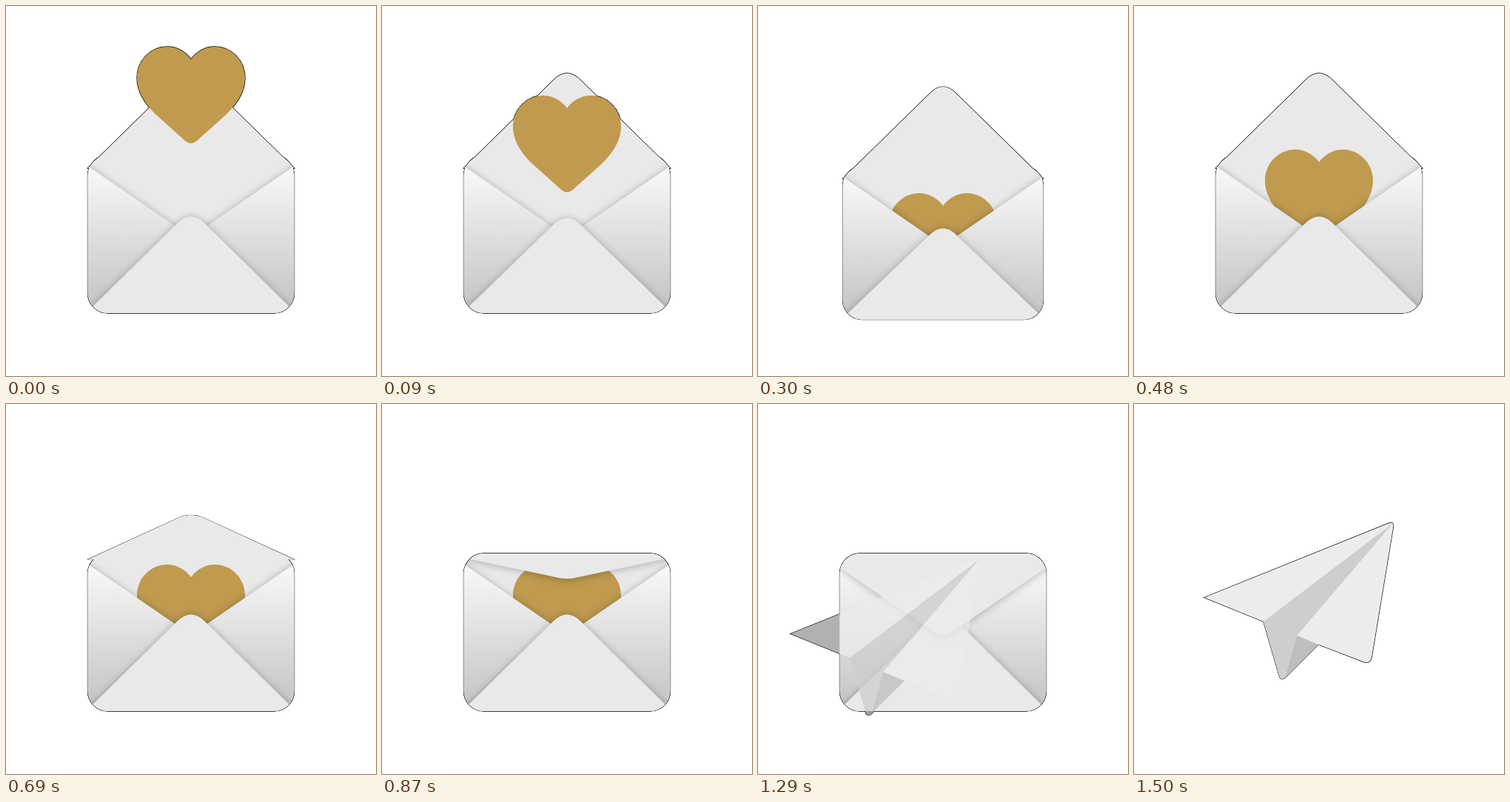
Recreate the animation shown at these times as an HTML page. Size 500 by 500 pixels, loop 1830 ms.

```html
<!DOCTYPE html>
<html lang="en">
<head>
<meta charset="utf-8">
<title>Envelope</title>
<style>
  html, body { margin: 0; width: 100%; height: 100%; overflow: hidden; background: #fff; }
  svg { display: block; width: 100%; height: 100%; }
  .edge { fill: #000; stroke: #000; stroke-width: 1.3; }
  .edge * { vector-effect: non-scaling-stroke; }
  .shade { filter: drop-shadow(0 0 5px rgba(0, 0, 0, .25)); }
  .flap-shade { filter: drop-shadow(0 3px 5px rgba(0, 0, 0, .2)); }
</style>
</head>
<body>
<svg viewBox="0 0 500 500">
  <defs>
    <linearGradient id="side" gradientUnits="userSpaceOnUse" x1="0" y1="216" x2="0" y2="412">
      <stop offset="0" stop-color="#f9f9f9"/>
      <stop offset="1" stop-color="#c3c3c3"/>
    </linearGradient>
    <rect id="body" x="110.5" y="202" width="279" height="213" rx="27"/>
    <path id="openFlap" d="M110.5 17L233-103Q250-119 267-103L389.5 17Z"/>
    <path id="heart" d="M0 17C-8 6-20 0-32 0C-55 0-73 19-73 42C-73 62-60 80-46 93L-7 128Q0 133 7 128L46 93C60 80 73 62 73 42C73 19 55 0 32 0C20 0 8 6 0 17Z"/>
    <path id="planeShape" d="M95 261.5L346 160.5Q351 160 350.5 165L321 343Q319 350 312 349L249 325L204 370Q200 373 197 370L175 294Z"/>
    <clipPath id="bodyClip"><use href="#body"/></clipPath>
  </defs>

  <g id="letterEdge" class="edge">
    <g class="letterPose">
      <use href="#body"/>
      <use class="openPose" href="#openFlap"/>
    </g>
    <use class="heartPose" href="#heart"/>
  </g>
  <use id="planeEdge" class="edge planePose" href="#planeShape"/>

  <g id="letter">
    <g class="letterPose" fill="#e9e9e9">
      <use href="#body"/>
      <use class="openPose" href="#openFlap"/>
    </g>
    <use class="heartPose" href="#heart" fill="#bf9a4f"/>
    <g class="letterPose">
      <g clip-path="url(#bodyClip)">
        <g class="shade" fill="url(#side)">
          <path d="M100 209L250 312L100 422Z"/>
          <path d="M400 209L250 312L400 422Z"/>
        </g>
        <g class="shade"><path id="front" fill="#e9e9e9"/></g>
        <g id="closing" class="flap-shade">
          <path id="closedFlap" fill="#e9e9e9" d="M110.5 19L236 105Q250 117 264 105L389.5 19V0H110.5Z"/>
        </g>
      </g>
    </g>
  </g>

  <g id="plane" class="planePose">
    <use href="#planeShape" fill="#ececec"/>
    <path fill="#cecece" d="M175 294L350 161L220 313L204 370Q200 373 197 370Z"/>
    <path fill="#bebebe" d="M220 313L249 325L204 370Z"/>
  </g>
</svg>
<script>
  const LOOP = 1830, TICK = 30, HINGE = 202;
  const el = id => document.getElementById(id);
  const clamp = v => Math.min(1, Math.max(0, v));
  const smooth = (t, a, b) => { const p = clamp((t - a) / (b - a)); return p * p * (3 - 2 * p); };
  const show = (node, on) => node.setAttribute('display', on ? 'inline' : 'none');
  const pose = (name, value) =>
    document.querySelectorAll('.' + name).forEach(n => n.setAttribute('transform', value));

  // Smooth curve through [time, value] points, at rest at both ends
  function curve(keys, t) {
    const last = keys.length - 1;
    if (t <= keys[0][0]) return keys[0][1];
    if (t >= keys[last][0]) return keys[last][1];
    const i = keys.findIndex(k => k[0] > t) - 1;
    const slope = j => j === 0 || j === last ? 0
      : (keys[j + 1][1] - keys[j - 1][1]) / (keys[j + 1][0] - keys[j - 1][0]);
    const [t0, v0] = keys[i], [t1, v1] = keys[i + 1];
    const d = t1 - t0, p = (t - t0) / d, q = 1 - p;
    return q * q * (1 + 2 * p) * v0 + p * p * (3 - 2 * p) * v1
      + d * p * q * (q * slope(i) - p * slope(i + 1));
  }

  const heartY = [[30, 55], [90, 121], [180, 232], [240, 262], [300, 253], [390, 213], [480, 194], [600, 217]];
  const sink = [[120, 0], [240, 1], [300, .67], [420, 0]];
  const sag = [[60, 0], [90, 2], [240, 5], [300, 3.5], [420, 0]];

  function drawLetter(t) {
    const alpha = 1 - clamp((t - 1290) / 150);
    const visible = alpha >= .5;
    show(el('letter'), visible);
    show(el('letterEdge'), visible);
    if (!visible) return;
    el('letter').setAttribute('opacity', alpha);

    const s = curve(sink, t);
    pose('letterPose', `translate(250 ${253 + 20 * s}) scale(${1 - .0435 * s}) translate(-250 -253)`);
    pose('heartPose', `translate(250 ${curve(heartY, t)})`);

    const dy = curve(sag, t);
    el('front').setAttribute('d',
      `M100 423L232 ${293 + dy}Q250 ${276 + dy} 268 ${293 + dy}L400 423Z`);

    const open = 1 - smooth(t, 570, 800), shut = smooth(t, 800, 990);
    pose('openPose', `translate(0 ${HINGE}) scale(1 ${Math.max(open, .001)})`);
    document.querySelectorAll('.openPose').forEach(n => show(n, open > 0));
    show(el('closing'), shut > 0);
    el('closedFlap').setAttribute('transform', `translate(0 ${HINGE}) scale(1 ${shut})`);
  }

  function drawPlane(t) {
    const visible = t >= 1200;
    show(el('plane'), visible);
    show(el('planeEdge'), visible);
    if (!visible) return;
    const left = .475 * Math.pow(clamp((1500 - t) / 300), 1.8);
    pose('planePose', `translate(${-204 * left} ${196 * left})`);
    el('plane').setAttribute('opacity', 1 - left);
  }

  function draw(now) {
    const t = Math.floor((now % LOOP) / TICK) * TICK;
    drawLetter(t);
    drawPlane(t);
  }

  const start = performance.now();
  function loop() {
    draw(performance.now() - start);
    requestAnimationFrame(loop);
  }
  loop();
</script>
</body>
</html>
```
